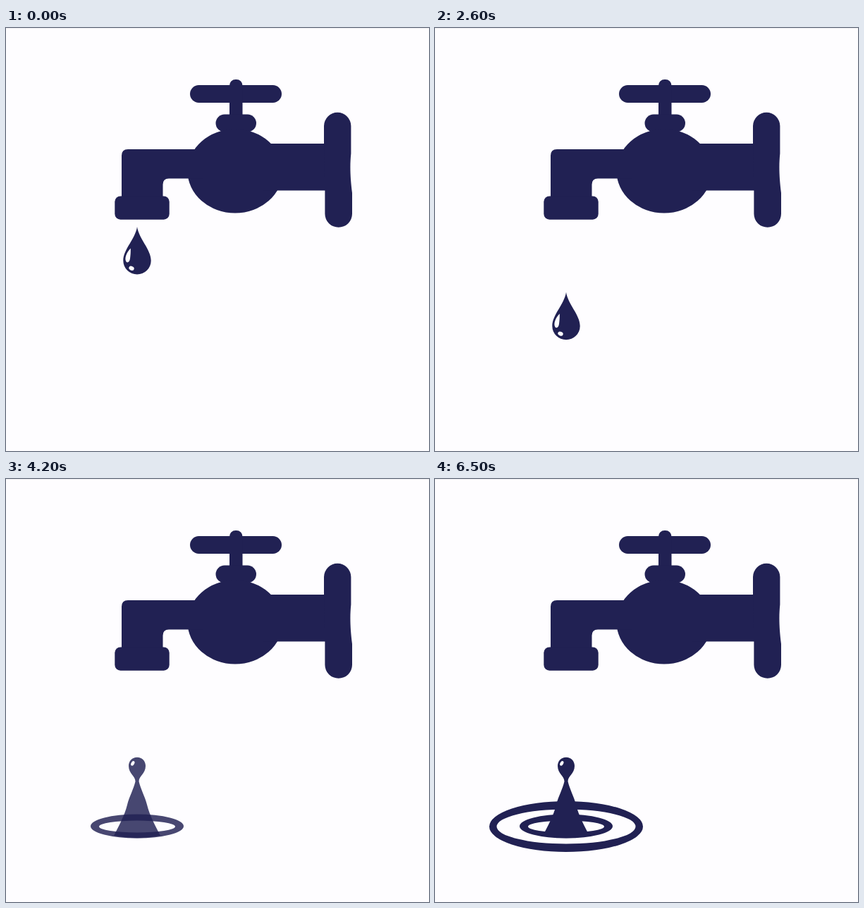
Recreate the animation shown at these times as an HTML page. Size 600x600 px, loop 6700 ms.

```html
<!DOCTYPE html>
<html lang="en">
<head>
<meta charset="utf-8">
<title>Dripping tap</title>
<style>
  html, body { margin: 0; width: 100%; height: 100%; overflow: hidden; background: #fefdff; }
  svg { display: block; width: 100vw; height: 100vh; fill: #212153; }
  .shine { fill: #fefdff; }
</style>
</head>
<body>
<svg viewBox="0 0 600 600">
  <rect width="600" height="1" fill="#f1f0f3"/>

  <g id="tap">
    <rect x="261" y="81" width="130" height="25" rx="12.5"/>
    <rect x="317" y="73" width="18.5" height="60" rx="8.5"/>
    <rect x="297.5" y="122.5" width="57.5" height="25" rx="12.5"/>
    <ellipse cx="325" cy="203" rx="67.5" ry="59.5"/>
    <rect x="365" y="164" width="95" height="66.5"/>
    <path d="M451 139 A19.2 19.2 0 0 1 489.4 139 V178 C487.8 194 488 210 491 234
             V263.5 A19.3 19.3 0 0 1 452.4 263.5 V230 L451 164 Z"/>
    <path d="M164 244 V181 Q164 172 173 172 H280 V213.5 H231 Q222.5 213.5 222.5 222 V244 Z"/>
    <rect x="154.3" y="238.5" width="77.4" height="33.2" rx="8"/>
  </g>

  <g id="ripple" opacity="0">
    <path fill-rule="evenodd" d="M77 493 a109 36 0 1 0 218 0 a109 36 0 1 0 -218 0 Z
             M87.5 493 a98.5 24.5 0 1 0 197 0 a98.5 24.5 0 1 0 -197 0 Z"/>
  </g>

  <g id="ring" opacity="0">
    <path fill-rule="evenodd" d="M120 492.5 a66 17 0 1 0 132 0 a66 17 0 1 0 -132 0 Z
             M132 493 a54 8.5 0 1 0 108 0 a54 8.5 0 1 0 -108 0 Z"/>
  </g>

  <g id="crown" opacity="0">
    <path d="M186 394.7 C193 394.7 198 400 198 407 C198 418 188.5 421 188.5 429
             C191 440 197 450 200 462 C204 478 212 492 219 506
             Q186 512.5 153 506 C160 492 168 478 172 462
             C175 450 181 440 183.5 429 C183.5 421 174 418 174 407
             C174 400 179 394.7 186 394.7 Z"/>
    <ellipse class="shine" cx="179.8" cy="403.3" rx="2.2" ry="3.6" transform="rotate(30 179.8 403.3)"/>
  </g>

  <g id="drop">
    <path d="M186 282 C188.5 299 205.7 314 205.7 330 A19.7 19.5 0 0 1 166.3 330
             C166.3 314 183.5 299 186 282 Z"/>
    <path class="shine" d="M176.8 312.5 C171 318 167.5 327 170.5 331.5 C172.5 334 175.5 331.5 176 327 C176.6 322 177 318 176.8 312.5 Z"/>
    <ellipse class="shine" cx="178" cy="340.8" rx="3.8" ry="2.9" transform="rotate(25 178 340.8)"/>
  </g>
</svg>
<script>
  const LOOP = 6700, STEP = 100, LAST = 6500;
  const FALL = 0.0357; // px per ms

  // Opacity ramps: start ms, end ms, from, to
  const fades = {
    drop:   [2950, 3850, 1, 0],
    crown:  [3270, 4400, 0, 1],
    ring:   [3270, 4400, 0, 1],
    ripple: [4330, 5430, 0, 1]
  };
  const part = id => document.getElementById(id);

  function draw(now) {
    const t = Math.min(LAST, Math.floor(now % LOOP / STEP) * STEP);
    for (const [id, [start, end, from, to]] of Object.entries(fades)) {
      const p = Math.min(1, Math.max(0, (t - start) / (end - start)));
      part(id).setAttribute("opacity", from + (to - from) * p);
    }
    part("drop").setAttribute("transform", `translate(0 ${t * FALL})`);
  }

  const begin = performance.now();
  function tick() {
    draw(performance.now() - begin);
    requestAnimationFrame(tick);
  }
  tick();
</script>
</body>
</html>
```
